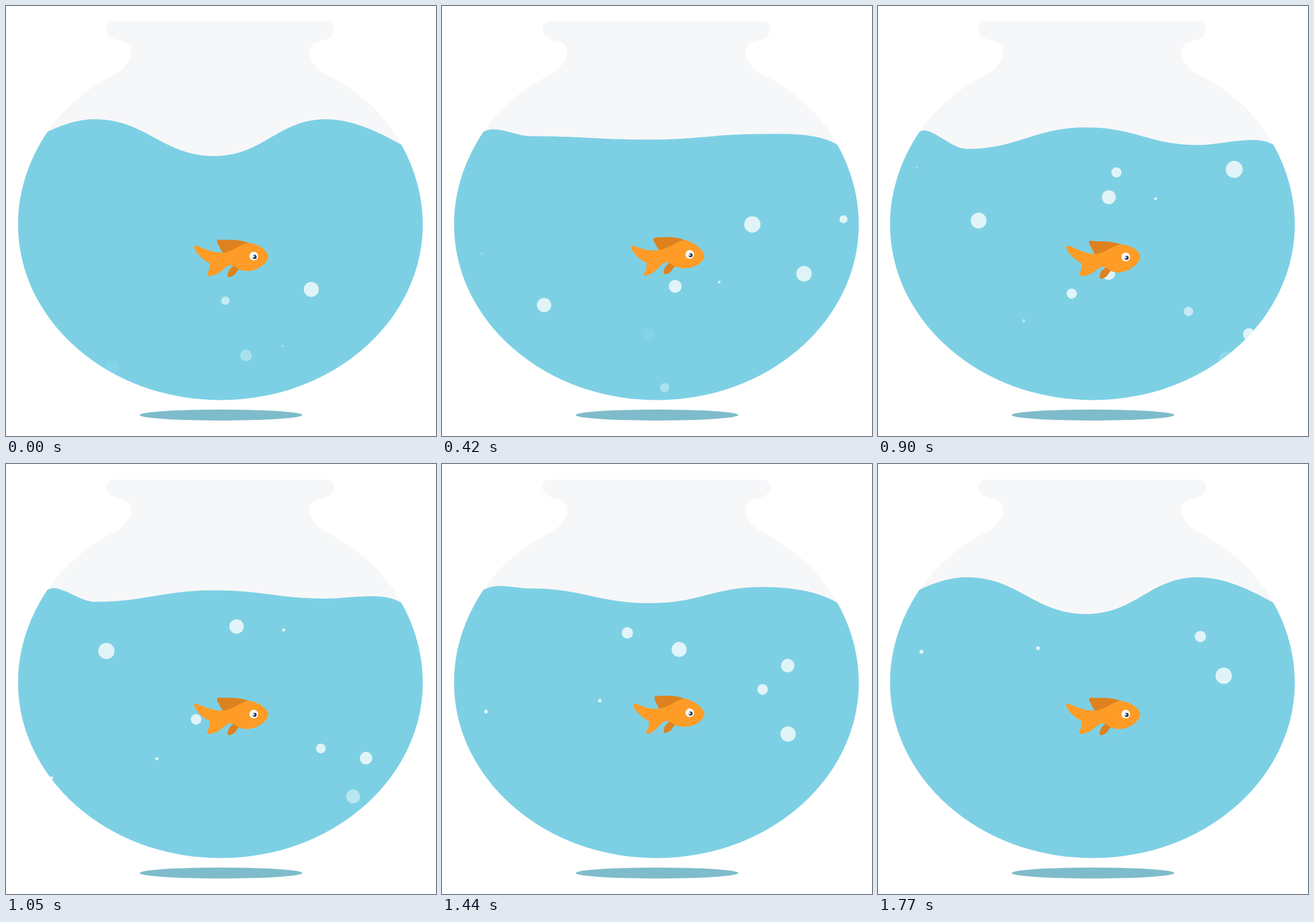
Write an HTML page that moves like this. It is 748 px wide and 748 px high and loops after 1.8 s.

```html
<!DOCTYPE html>
<html lang="en">
<head>
<meta charset="utf-8">
<title>Fish bowl</title>
<style>
  html, body { margin: 0; width: 100%; height: 100%; overflow: hidden; background: #fff; }
  svg { display: block; width: 100vw; height: 100vh; }
</style>
</head>
<body>
<svg viewBox="0 0 748 748">
  <defs>
    <path id="half" d="M375 27H188C180 27 175 33 175 41C175 52 186 58 200 61C211 63 218 70 218 81
      C218 94 205 110 190 118C146 141 103 173 72 219C39 268 21 324 21 380C21 547 177 685.5 373 685.5H375Z"/>
    <clipPath id="inside">
      <use href="#half"/>
      <use href="#half" transform="matrix(-1 0 0 1 746 0)"/>
    </clipPath>
  </defs>
  <ellipse cx="374" cy="711.5" rx="141.5" ry="9.5" fill="#7ebccb"/>
  <g clip-path="url(#inside)">
    <rect width="748" height="748" fill="#f6f7f9"/>
    <path id="water" fill="#7dd0e4"/>
    <g id="bubbles" fill="#fff"></g>
  </g>
  <path id="dorsal" fill="#dd821e"/>
  <path id="pelvic" fill="#dd821e"/>
  <path id="body" fill="#ff9c27"/>
  <g id="eye">
    <circle cx="431" cy="435" r="7.5" fill="#fff"/>
    <circle cx="432.4" cy="436.4" r="3.6" fill="#2f4052"/>
    <circle cx="430.6" cy="435.8" r="1.7" fill="#fff"/>
  </g>
</svg>
<script>
const LOOP = 1800, STEP = 30, SPAN = LOOP - STEP;
const LIFE = 1272, POP_Y = 262, DECAY = 0.0027;
const $ = id => document.getElementById(id);
const clamp = v => Math.min(1, Math.max(0, v));

// Resting fish outlines, bent by warp()
const shapes = {
  body: 'M331 417C343 421 360 430 378 429C394 428 407 414 422 412C436 413 455 423 456.5 436' +
    'C455 447 438 461 419 461C402 461 401 451 390 451C380 452 375 467 354 469.5' +
    'C349 470 349 467 351 463C354 457 355 455 354 447C341 441 329 428 327.5 420C327 417 329 416 331 417Z',
  dorsal: 'M371 406.5C385 408 403 404 424 413L400 428L378 431C374 424 369 415 367.5 412C366 408 368 406 371 406.5Z',
  pelvic: 'M386 466C386.5 460 391 455 397 451L406 458C400 460 402 469 388.5 471.7C385 472 385.5 469 386 466Z'
};

function addBubble(birth, x, drift, radius) {
  const node = document.createElementNS('http://www.w3.org/2000/svg', 'circle');
  $('bubbles').append(node);
  // Bubbles that drift in from the right start deeper, so they climb faster
  const speed = Math.min(0.43, 0.32 + drift * 0.0007);
  return { node, birth, x, drift, radius, speed };
}

const bubbles = [
  addBubble(-545, 694, 60, 5.7),
  addBubble(-436, 544, -42, 11.8),
  addBubble(-314, 616, 100, 11.4),
  addBubble(-312, 68, 4, 0.8),
  addBubble(-268, 418, -75, 6.9),
  addBubble(-160, 400, 27, 9.7),
  addBubble(-137, 483, -3, 2),
  addBubble(-26, 174, 12, 11.2),
  addBubble(249, 318, 110, 7.7),
  addBubble(378, 588, 235, 9.3),
  addBubble(390, 416, -60, 10.4),
  addBubble(633, 563, -47, 7.7),
  addBubble(698, 75, 11, 2.7),
  addBubble(705, 281, -47, 2.6),
  addBubble(834, 601, 5, 11.6)
];

// Distance climbed at unit speed: slow at first, then steady
const climb = age => age - 0.4 / DECAY * (1 - Math.exp(-DECAY * age));

function drawBubbles(t) {
  for (const { node, birth, x, drift, radius, speed } of bubbles) {
    const age = Math.max(0, t - birth);
    node.setAttribute('cx', x + drift * Math.exp(-DECAY * age));
    node.setAttribute('cy', POP_Y + speed * (climb(LIFE) - climb(age)));
    node.setAttribute('r', radius * (1 + 0.00024 * age));
    node.setAttribute('opacity', 0.76 * clamp(age / 360) * clamp((LIFE - age) / 50));
  }
}

function drawWater(t) {
  const peak = 810;
  const q = t < peak ? t / peak : (SPAN - t) / (SPAN - peak);
  const k = (a, b) => (a + (b - a) * q).toFixed(2);
  const left = k(197, 254), mid = k(261, 206), right = k(197, 246.5);
  $('water').setAttribute('d', `M0 219H72C${k(100, 90)} ${k(205, 206)} ${k(128, 125)} ${left} 155 ${left}` +
    `C243 ${left} 273 ${mid} 361 ${mid}S472 ${right} 557 ${right}` +
    `C600 ${right} ${k(645, 657)} ${k(217, 223)} 687 241H748V748H0Z`);
}

function drawFish(t) {
  const levels = [0, -5.3, 3, -5.3, 0];
  const beat = t / SPAN * 4, i = Math.min(3, Math.floor(beat));
  const bob = levels[i] + (levels[i + 1] - levels[i]) * (beat - i);
  const swish = 6 * Math.max(0, Math.cos(Math.PI * (beat - 1.36)));

  // The nose and tail stay put while the middle rises and sinks
  const warp = (x, y) => {
    const bend = clamp((x - 352) / 26) * clamp((462 - x) / 40);
    return `${(x + swish * clamp((378 - x) / 24)).toFixed(2)} ${(y + bob * bend).toFixed(2)}`;
  };
  for (const [id, outline] of Object.entries(shapes)) {
    $(id).setAttribute('d', outline.replace(/([\d.]+) ([\d.]+)/g, (_, x, y) => warp(+x, +y)));
  }
  $('eye').setAttribute('transform', `translate(0 ${(bob * 0.58).toFixed(2)})`);
}

function draw(time) {
  const t = Math.floor((time % LOOP) / STEP) * STEP;
  drawWater(t);
  drawBubbles(t);
  drawFish(t);
}

const start = performance.now();
function tick(now) {
  draw(Math.max(0, now - start));
  requestAnimationFrame(tick);
}
draw(0);
requestAnimationFrame(tick);
</script>
</body>
</html>
```
